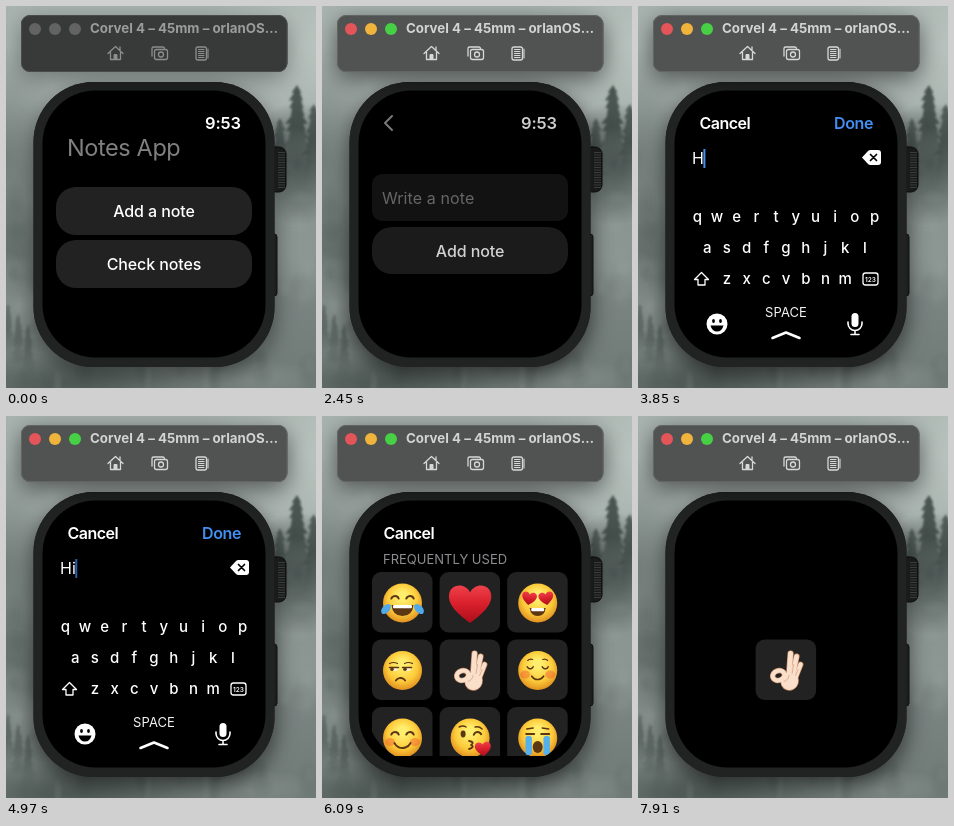
These frames come from a looping animation (310x382 px, 8 s). An HTML page with a canvas:

```html
<!DOCTYPE html>
<html lang="en">
<head>
<meta charset="utf-8">
<title>Notes on a watch</title>
<style>
html, body { margin: 0; width: 100%; height: 100%; overflow: hidden; background: #8d9693; }
canvas { display: block; width: 310px; height: 382px; }
</style>
</head>
<body>
<canvas id="stage"></canvas>
<script>
const W = 310, H = 382, LOOP = 8000, TICK = 70;
const FONT = 'Inter, "Open Sans", sans-serif';
const TILE = '#222223', BLUE = '#438ff2', TAU = Math.PI * 2;

const canvas = document.getElementById('stage');
const dpr = window.devicePixelRatio || 1;
canvas.width = W * dpr;
canvas.height = H * dpr;
let c = canvas.getContext('2d');

// ---------- helpers ----------
function box(x, y, w, h, r, fill, stroke, lw = 1) {
  c.beginPath();
  c.roundRect(x, y, w, h, r);
  paint(fill, stroke, lw);
}
function paint(fill, stroke, lw = 1) {
  if (fill) { c.fillStyle = fill; c.fill(); }
  if (stroke) { c.strokeStyle = stroke; c.lineWidth = lw; c.stroke(); }
}
function oval(x, y, rx, ry, fill, stroke, lw, rot = 0) {
  c.beginPath();
  c.ellipse(x, y, rx, ry, rot, 0, TAU);
  paint(fill, stroke, lw);
}
function arc(x, y, r, a, b, color, lw) {
  c.beginPath();
  c.arc(x, y, r, a * Math.PI, b * Math.PI);
  paint(null, color, lw);
}
function path(d, fill, stroke, lw) {
  const p = new Path2D(d);
  if (fill) { c.fillStyle = fill; c.fill(p); }
  if (stroke) { c.strokeStyle = stroke; c.lineWidth = lw; c.stroke(p); }
}
function text(s, x, y, size, color, { weight = 400, align = 'left', gap = 0 } = {}) {
  c.font = `${weight} ${size}px ${FONT}`;
  c.letterSpacing = gap + 'px';
  c.textAlign = align;
  c.fillStyle = color;
  c.fillText(s, x, y);
  return c.measureText(s).width;
}
function layer(alpha, dx, dy, draw) {
  if (alpha <= 0) return;
  c.save();
  c.globalAlpha = Math.min(1, alpha);
  c.translate(dx, dy);
  draw();
  c.restore();
}
function fade(x0, y0, x1, y1, ...stops) {
  const g = c.createLinearGradient(x0, y0, x1, y1);
  stops.forEach((s, i) => g.addColorStop(i / (stops.length - 1), s));
  return g;
}
function randomizer(seed) {
  return () => (seed = (seed * 16807) % 2147483647) / 2147483647;
}

// ---------- misty forest ----------
function mist(x, y, rx, ry, rgb, alpha) {
  const g = c.createRadialGradient(0, 0, 0, 0, 0, 1);
  g.addColorStop(0, `rgba(${rgb},${alpha})`);
  g.addColorStop(0.5, `rgba(${rgb},${alpha * 0.6})`);
  g.addColorStop(1, `rgba(${rgb},0)`);
  c.save();
  c.translate(x, y);
  c.scale(rx, ry);
  oval(0, 0, 1, 1, g);
  c.restore();
}
function tree(x, top, h, w, color, rnd) {
  const n = 11, left = [], right = [];
  for (let i = 1; i <= n; i++) {
    const y = top + h * i / n, half = w / 2 * Math.sqrt(i / n);
    right.push([x + half * (0.6 + rnd() * 0.6), y], [x + half * 0.6, y]);
    left.unshift([x - half * 0.6, y], [x - half * (0.6 + rnd() * 0.6), y]);
  }
  c.beginPath();
  c.moveTo(x, top);
  [...right, ...left].forEach(p => c.lineTo(...p));
  c.closePath();
  paint(fade(0, top, 0, top + h, color, color, 'rgba(70,80,77,0)'));
}
function forest() {
  const rnd = randomizer(41), dark = '50,61,58', pale = '165,175,171';
  c.fillStyle = fade(0, 0, 0, H, '#a9b4b0', '#a8b2ae', '#909a97', '#7a8481', '#6f7976');
  c.fillRect(0, 0, W, H);
  mist(300, 40, 110, 70, '196,206,201', 0.6);
  mist(0, 150, 60, 110, dark, 0.38);
  mist(6, 245, 55, 55, dark, 0.34);
  mist(18, 300, 50, 36, pale, 0.3);
  mist(60, 378, 110, 32, dark, 0.5);
  mist(292, 158, 52, 62, dark, 0.75);
  mist(296, 255, 50, 40, pale, 0.3);
  mist(245, 374, 80, 20, pale, 0.28);
  for (let i = 0; i < 60; i++) {
    const x = rnd() * W, y = 190 + rnd() * 190;
    mist(x, y, 5 + rnd() * 10, 8 + rnd() * 18, rnd() < 0.55 ? dark : pale, 0.14);
  }
  c.filter = `blur(${0.8 * dpr}px)`;
  tree(291, 79, 85, 32, 'rgba(58,69,66,.85)', rnd);
  tree(308, 98, 80, 28, 'rgba(62,73,70,.8)', rnd);
  tree(274, 112, 70, 24, 'rgba(66,77,74,.75)', rnd);
  for (let i = 0; i < 3; i++) tree(2 + i * 10, 298 + i * 10, 50, 15, 'rgba(66,77,74,.5)', rnd);
  c.filter = 'none';
}
function cacheForest() {
  const off = document.createElement('canvas'), main = c;
  off.width = canvas.width;
  off.height = canvas.height;
  c = off.getContext('2d');
  c.scale(dpr, dpr);
  forest();
  c = main;
  return off;
}

// ---------- window bar and watch body ----------
function bar(active) {
  c.save();
  c.shadowColor = `rgba(0,0,0,${active ? 0.55 : 0.35})`;
  c.shadowBlur = 24 * dpr;
  c.shadowOffsetY = 7 * dpr;
  box(15, 9, 266.5, 57, 9, active ? '#505352' : '#383a39');
  c.restore();
  box(15.5, 9.5, 265.5, 56, 8.5, null, active ? '#626564' : '#4a4c4b');
  ['#e4555a', '#f0b33c', '#47cf45'].forEach((color, i) =>
    oval(29 + i * 20, 23, 6, 6, active ? color : '#626362'));
  text('Corvel 4 – 45mm – orlanOS…', 84, 27, 13.3, active ? '#d2d3d2' : '#9b9c9b', { weight: 700 });

  const ink = active ? '#d6d7d6' : '#8c8d8c';
  path('M102 47.5 L109.5 40.5 L117 47.5 M104.5 46 V53.5 H114.5 V46 M114 44 V41', null, ink, 1.3);
  path('M108 53 V48.5 H111 V53 Z', ink, ink, 1);
  path('M146 50 V42.5 Q146 41 147.5 41 H157 Q158.5 41 158.5 43', null, ink, 1.3);
  box(148.5, 43.5, 13, 10, 2, null, ink, 1.3);
  oval(155, 48.5, 2.5, 2.5, null, ink, 1.3);
  box(190, 41, 10.5, 13, 2, null, ink, 1.3);
  path('M192.5 43.5 H198 M192.5 45.5 H198 M192.5 47.5 H198 M192.5 49.5 H198 M192.5 51.5 H198 M202 43 V52', null, ink, 1.1);
}
function body(active) {
  c.save();
  c.shadowColor = `rgba(0,0,0,${active ? 0.6 : 0.45})`;
  c.shadowBlur = 22 * dpr;
  c.shadowOffsetY = 8 * dpr;
  box(27.5, 76, 241, 285, 60, '#212222');
  c.restore();
  box(263, 141, 17, 45, 7, '#191a1a', '#0d0d0d');
  for (let y = 146; y < 183; y += 2.5) {
    c.fillStyle = '#3a3b3b';
    c.fillRect(272, y, 7, 1);
  }
  box(265, 228, 6, 62, 3, '#1d1e1e', '#101010');
  box(27.5, 76, 241, 285, 60, '#212222');
  box(36.5, 84.5, 223, 267, 53, '#000');
}

// ---------- screens ----------
function button(label, y, h, pressed) {
  box(50, y, 196, h, 20, pressed ? '#171718' : TILE);
  text(label, 148, y + h / 2 + 6, 16, pressed ? '#aaa' : '#fff', { weight: 500, align: 'center', gap: -0.1 });
}
function clock() {
  text('9:53', 235, 123, 16.5, '#fff', { weight: 600, align: 'right', gap: -0.1 });
}
function menu(pressed) {
  text('Notes App', 61, 150, 23.5, '#808081', { gap: -0.4 });
  button('Add a note', 181, 48, pressed);
  button('Check notes', 234, 48);
}
function form(pressed) {
  path('M70 110 L63 117 L70 124', null, '#98989a', 2);
  box(50, 168, 196, 47, 10, pressed ? '#171718' : TILE);
  text('Write a note', 60, 197.5, 16, '#7c7c7e', { gap: 0.1 });
  button('Add note', 221, 47);
}
function cancel() {
  text('Cancel', 61.5, 123, 16, '#fff', { weight: 600, gap: -0.5 });
}

const ROWS = [['qwertyuiop', 59.3, 216], ['asdfghjkl', 69.2, 247], ['zxcvbnm', 89, 278]];

function keyboard({ typed, caps, cursor, popup, space, smile }) {
  cancel();
  text('Done', 235, 123, 16, BLUE, { weight: 600, align: 'right', gap: -0.4 });
  const w = text(typed, 54, 158, 16, '#fff');
  if (cursor) {
    c.fillStyle = cursor;
    c.fillRect(54 + w - (typed ? 0.5 : 0), 143, 2, 19);
  }
  path('M224 151.5 L230 145 Q231 144 232.5 144 H240 Q243 144 243 147 V156 Q243 159 240 159 H232.5 Q231 159 230 158 Z', '#fff');
  path('M232.5 148.5 L238.5 154.5 M238.5 148.5 L232.5 154.5', null, '#000', 1.7);

  for (const [row, x, y] of ROWS) {
    [...row].forEach((k, i) => {
      const kx = x + i * 19.7, label = caps ? k.toUpperCase() : k;
      if (popup && popup.key === k) {
        oval(kx, y - 6, popup.size, popup.size, '#3d3d3f');
        text(label, kx, y + 2, popup.size * 1.15, '#fff', { weight: 500, align: 'center' });
      } else {
        text(label, kx, y, 15, '#fff', { weight: 500, align: 'center' });
      }
    });
  }
  path('M63.5 266.5 L70.5 273.5 H67 V279 H60 V273.5 H56.5 Z', caps ? '#fff' : null, '#fff', 1.3);
  box(225, 267, 15, 12, 2.5, null, '#fff', 1.3);
  text('123', 232.5, 275.5, 6.5, '#fff', { weight: 600, align: 'center' });

  text('SPACE', 148, 311, 13, space, { align: 'center', gap: 0.1 });
  path('M134.5 332 L148 326.5 L161.5 332', null, '#fff', 2.6);

  oval(79, 318, 10.5, 10.5, smile);
  oval(75.5, 315, 1.4, 2, '#000');
  oval(82.5, 315, 1.4, 2, '#000');
  path('M72.5 319.5 H85.5 Q84 325.5 79 325.5 Q74 325.5 72.5 319.5 Z', '#000');
  box(213.5, 307, 7, 14, 3.5, '#fff');
  path('M210 316 V317.5 A7 7 0 0 0 224 317.5 V316 M217 324.5 V328 M213 328.5 H221', null, '#fff', 1.6);
}

// ---------- emoji, each drawn around its own centre ----------
const BROWN = '#5d3613';

function heart(x, y, s, rot = 0) {
  c.save();
  c.translate(x, y);
  c.rotate(rot);
  c.scale(s, s);
  path('M0 18 C-8 12 -20 3 -20 -7 C-20 -19 -5 -21 0 -11 C5 -21 20 -19 20 -7 C20 3 8 12 0 18 Z',
    fade(0, -18, 0, 18, '#f0424c', '#d81f2c', '#ad0f1b'));
  c.restore();
}
function face() {
  const g = c.createRadialGradient(0, -7, 4, 0, -2, 22);
  g.addColorStop(0, '#ffee6e');
  g.addColorStop(0.6, '#fccb3a');
  g.addColorStop(1, '#e08d1e');
  oval(0, 0, 19.5, 19.5, g);
}
const pair = draw => [-1, 1].forEach(draw);
function blush() {
  pair(s => oval(s * 12.5, 4, 5, 4, 'rgba(240,90,50,.45)'));
}
function happyEyes(y) {
  pair(s => arc(s * 7.5, y, 4, 1.12, 1.88, BROWN, 2));
}
function grin(y, r) {
  path(`M${-r} ${y} H${r} Q${r - 1} ${y + r} 0 ${y + r} Q${1 - r} ${y + r} ${-r} ${y} Z`, BROWN);
  box(1.5 - r, y, 2 * r - 3, 3.2, 1.2, '#fff');
}

const EMOJI = [
  function joy() {
    face();
    happyEyes(-3);
    grin(2, 11);
    pair(s => oval(s * 16.5, 6, 3.6, 6, '#4fa9ea', null, 0, s * -0.75));
  },
  function love() { heart(0, 1, 1.06); },
  function heartEyes() {
    face();
    pair(s => heart(s * 8.5, -4.5, 0.37, s * -0.15));
    grin(5, 8);
  },
  function unamused() {
    face();
    pair(s => {
      const x = s * 6.5 - 2;
      oval(x, -1.5, 4, 2, '#fff3d0');
      oval(x - 2, -1.3, 1.8, 1.8, BROWN);
      path(`M${x - 4.5} -3 H${x + 4.5}`, null, BROWN, 1.5);
    });
    path('M-13 -7 Q-9 -9 -5 -7 M2 -7 Q6 -9 10 -7', null, BROWN, 1.2);
    arc(-2, 13, 5.5, 1.18, 1.82, BROWN, 1.8);
  },
  function okHand() {
    const hand = grow => {
      const ink = grow ? '#cf9570' : '#fae0cb';
      path('M3 4 L4.5 -17', null, ink, 4.8 + grow);
      path('M6.5 5 L10.5 -14', null, ink, 4.6 + grow);
      path('M9 8 L14.5 -6', null, ink, 4.2 + grow);
      oval(3.5, 10.5, 8.5 + grow / 2, 9 + grow / 2, ink, null, 0, 0.3);
      oval(-7.5, 5, 6, 4.8, null, ink, 4.2 + grow, -0.3);
    };
    hand(1.4);
    hand(0);
    path('M6 3 L7.5 -6 M9.5 5 L12 -1 M-2 11 Q2 10 3 5', null, '#dba98a', 0.9);
  },
  function relaxed() {
    face();
    blush();
    pair(s => arc(s * 7.5, -5, 3.2, 0.12, 0.88, BROWN, 1.5));
    path('M-10 -10 Q-8 -12 -5 -11 M5 -11 Q8 -12 10 -10', null, BROWN, 1.1);
    arc(0, 2, 7, 0.18, 0.82, BROWN, 1.7);
  },
  function blushing() {
    face();
    blush();
    happyEyes(-2);
    arc(0, 1, 9, 0.15, 0.85, BROWN, 2);
  },
  function kiss() {
    face();
    oval(-7, -4, 2.5, 3.4, BROWN);
    arc(7.5, -2, 4, 1.1, 1.85, BROWN, 2);
    path('M-11 -11 Q-7 -13 -4 -11 M5 -11 Q9 -12 12 -9', null, BROWN, 1.4);
    path('M-1 3 Q5 4 1 7 Q5 9 -1 11', null, BROWN, 1.9);
    heart(13, 11, 0.4, -0.1);
  },
  function sobbing() {
    face();
    pair(s => {
      path(`M${s * 7.5 - 4} -4 H${s * 7.5 + 4}`, null, BROWN, 2);
      box(s * 9 - 3.2, -2, 6.4, 19, 2.5, '#55b0ee');
      path(`M${s * 4.5} -10 L${s * 11} -9`, null, BROWN, 1.4);
    });
    oval(0, 9, 5, 6, BROWN);
  }
];

const PICKED = 4;
function emojiTile(i) {
  const x = 50 + (i % 3) * 67.6, y = 156 + Math.floor(i / 3) * 67.5;
  box(x, y, 60.5, 60.5, 9, TILE);
  c.save();
  c.translate(x + 30.5, y + 31);
  EMOJI[i]();
  c.restore();
}
function picker(alpha) {
  layer(alpha, 0, 0, () => {
    cancel();
    text('FREQUENTLY USED', 61, 148, 13, '#8d8d91');
    EMOJI.forEach((_, i) => i !== PICKED && emojiTile(i));
  });
  emojiTile(PICKED);
}

// ---------- timeline ----------
const stepFrom = (t, start) => (t - start) / TICK + 1;
const rise = (i, last, k) => i >= last ? 0 : 245 * Math.exp(-k * (i - 1));

function sheet(dy, draw) {
  layer(1, 0, dy, () => {
    c.fillStyle = '#000';
    c.fillRect(36, 84, 224, 270);
    draw();
  });
}
function keys(t) {
  let popup = null;
  if (t >= 3640 && t < 3780) popup = { key: 'h', size: t < 3710 ? 19 : 15 };
  if (t >= 4340 && t < 4480) popup = { key: 'i', size: t < 4410 ? 19 : 15 };
  keyboard({
    typed: t < 3710 ? '' : t < 4410 ? 'H' : t < 5040 ? 'Hi' : 'Hi ',
    caps: t < 3780,
    cursor: t < 2940 ? null : t === 4970 ? '#2c5da6' : BLUE,
    popup,
    space: t === 5040 ? '#777' : t === 5110 ? '#b0b0b0' : '#f2f2f2',
    smile: t === 5670 ? '#999' : '#fff'
  });
}
function screen(t) {
  if (t < 1050) {
    const i = stepFrom(t, 770);
    const q = Math.max(0, (i - 1) / 4), e = 1 - (1 - q) ** 3;
    clock();
    layer(1 - e * 1.1, -100 * e, 0, () => menu(i >= 1));
    if (q > 0) layer(e, 200 * (1 - e), 0, () => form());
  } else if (t < 3080) {
    const i = stepFrom(t, 2450);
    layer(i < 1 ? 1 : 1 - i / 5, 0, 0, () => { clock(); form(i >= 1); });
    if (i >= 1) sheet(rise(i, 10, 0.66), () => keys(t));
  } else if (t < 6090) {
    const i = stepFrom(t, 5670);
    layer(i < 1 ? 1 : 1 - i / 5, 0, 0, () => keys(t));
    if (i >= 1) sheet(rise(i, 7, 0.85), () => picker(1));
  } else {
    picker(1 - Math.max(0, stepFrom(t, 7630)) / 5);
  }
}

const backdrop = cacheForest();

function draw(now) {
  const t = Math.floor((now % LOOP) / TICK) * TICK;
  const active = t >= 770;
  c.setTransform(dpr, 0, 0, dpr, 0, 0);
  c.lineCap = c.lineJoin = 'round';
  c.drawImage(backdrop, 0, 0, W, H);
  body(active);
  bar(active);
  c.save();
  c.beginPath();
  c.rect(37, 85, 222, 255);
  c.clip();
  c.beginPath();
  c.roundRect(44, 88, 208, 260, 58);
  c.clip();
  screen(t);
  c.restore();
}

const start = performance.now();
function loop() {
  draw(performance.now() - start);
  requestAnimationFrame(loop);
}
loop();
</script>
</body>
</html>
```
